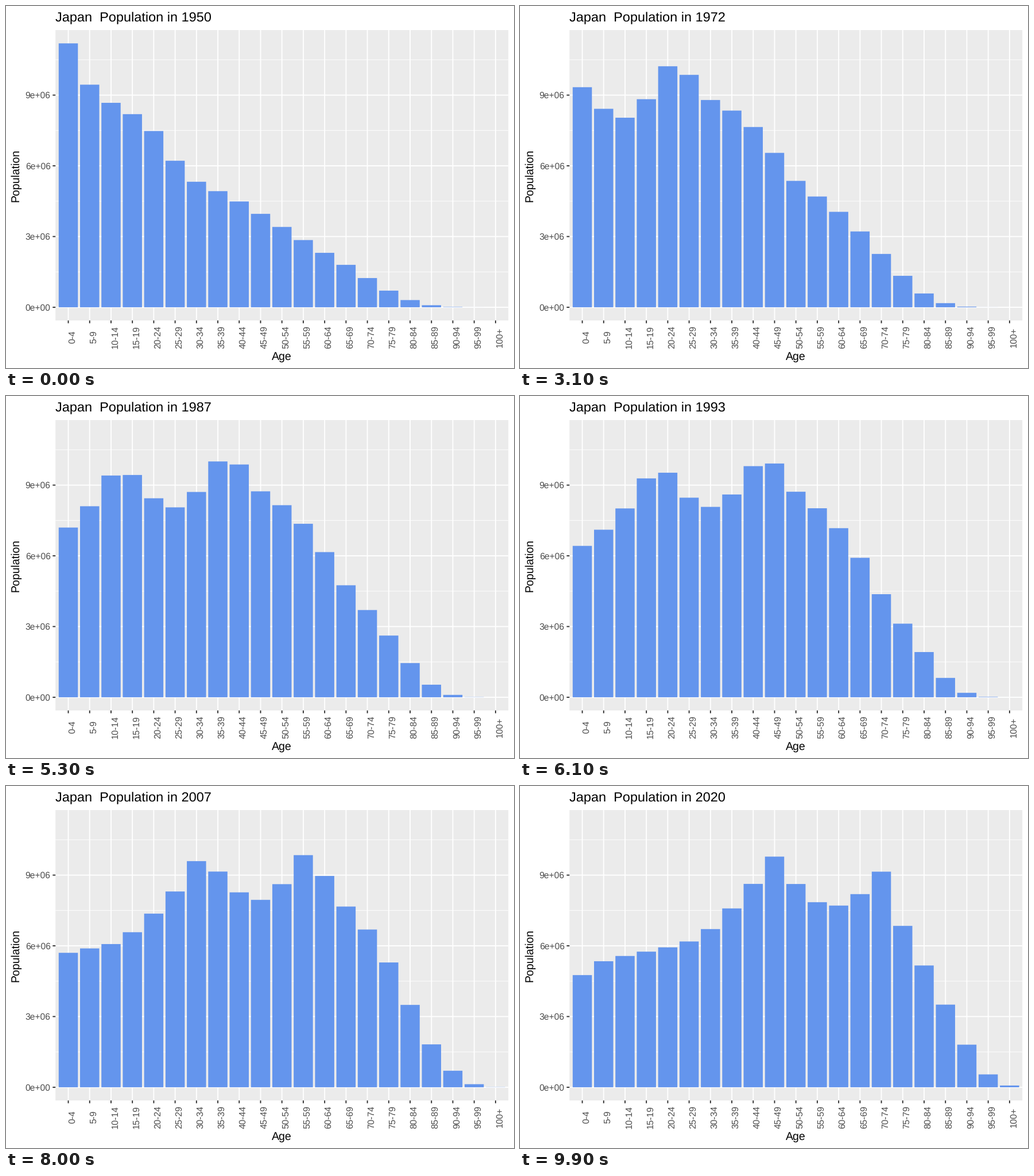
A matplotlib script that plays this animation: 885 by 632 pixels, repeating every 10 s.

```python
import numpy as np
import matplotlib
import matplotlib.pyplot as plt
from matplotlib.animation import FuncAnimation
from matplotlib.patches import Rectangle

matplotlib.rcParams["font.family"] = "Liberation Sans"
matplotlib.rcParams["text.hinting"] = "none"

W, H, DPI = 885, 632, 128
FRAMES, INTERVAL = 100, 100
FIRST, LAST = 1950, 2020

# Panel geometry in pixels, y pointing down
LEFT, RIGHT, TOP, BOTTOM = 86.2, 875.2, 42.0, 549.0
ZERO = BOTTOM - (BOTTOM - TOP) / 22
PER_MILLION = (ZERO - TOP) * 20 / 21 / 11.2
STEP = (RIGHT - LEFT) / 21.2
TICK = 4.9

STARTS = np.arange(0, 101, 5)
AGES = [f"{a}-{a + 4}" if a < 100 else "100+" for a in STARTS]
CENTERS = LEFT + STEP * (0.6 + np.arange(len(AGES)))

# Turning points of the five-year birth cohorts: mid birth year -> millions
COHORTS = {
    1870: 2.7, 1890: 3.2, 1899: 3.85, 1909: 4.72, 1919: 5.45, 1923: 6.25,
    1928: 7.5, 1934: 8.35, 1940: 8.85, 1944: 9.65, 1946: 10.15, 1948: 11.2,
    1949: 10.55, 1951: 9.95, 1954: 9.0, 1960: 8.05, 1966: 8.5, 1971: 9.55,
    1973: 10.0, 1976: 9.3, 1980: 8.2, 1988: 6.75, 1994: 6.1, 2010: 5.5,
    2014: 5.3, 2018: 4.76,
}


def population(year):
    """Millions per age group: cohort size times Gompertz survival."""
    age = STARTS + 2
    born = year - age
    lifespan = 81.7 + 9.4 * np.tanh((born - 1908) / 25)
    survival = np.exp(-np.exp((age - lifespan) / 11.5))
    return np.interp(born, list(COHORTS), list(COHORTS.values())) * survival


def tween():
    """Spread the yearly values over all frames, linear in between."""
    years = np.arange(FIRST, LAST + 1)
    rows = np.array([population(y) for y in years])
    keys = np.round((years - FIRST) * (FRAMES - 1) / (LAST - FIRST))
    return np.array([np.interp(np.arange(FRAMES), keys, v) for v in rows.T]).T


HEIGHTS = tween() * PER_MILLION

fig = plt.figure(figsize=(W / DPI, H / DPI), dpi=DPI, facecolor="white")
ax = fig.add_axes([0, 0, 1, 1])
ax.set_xlim(0, W)
ax.set_ylim(H, 0)
ax.axis("off")


def line(x0, y0, x1, y1, color="white", width=1.067, z=2):
    ax.plot([x0, x1], [y0, y1], color=color, lw=width, zorder=z,
            solid_capstyle="butt", snap=False)


def rect(x, y, w, h, color, z):
    return ax.add_patch(Rectangle((x, y), w, h, fc=color, lw=0, zorder=z,
                                  snap=False))


def label(x, y, text, size, color="black", ha="center", angle=0):
    return ax.text(x, y, text, size=size, color=color, ha=ha, va="baseline",
                   rotation=angle, rotation_mode="anchor")


rect(LEFT, TOP, RIGHT - LEFT, BOTTOM - TOP, "#EBEBEB", 0)

for m in np.arange(1.5, 11, 3):
    y = ZERO - m * PER_MILLION
    line(LEFT, y, RIGHT, y, width=0.533, z=1)

for m in range(0, 10, 3):
    y = ZERO - m * PER_MILLION
    line(LEFT, y, RIGHT, y)
    line(LEFT - TICK, y, LEFT, y, "#333333")
    label(77.6, y + 5.6, f"{m}e+{'06' if m else '00'}", 8.8, "#4D4D4D", "right")

for x, age in zip(CENTERS, AGES):
    line(x, TOP, x, BOTTOM)
    line(x, BOTTOM, x, BOTTOM + TICK, "#333333")
    label(x + 11.4, 578, age, 8.8, "#4D4D4D", angle=90)

label((LEFT + RIGHT) / 2, 617.8, "Age", 11)
label(22.2, (TOP + BOTTOM) / 2, "Population", 11, angle=90)
title = label(LEFT, 26.9, "", 13.2, ha="left")
bars = [rect(x - 0.45 * STEP, ZERO, 0.9 * STEP, 0, "#6495ED", 3)
        for x in CENTERS]


def draw(i):
    year = round(FIRST + i * (LAST - FIRST) / (FRAMES - 1))
    title.set_text(f"Japan  Population in {year}")
    for bar, h in zip(bars, HEIGHTS[i]):
        bar.set_height(-h)
    return [title, *bars]


anim = FuncAnimation(fig, draw, frames=FRAMES, interval=INTERVAL,
                     repeat=True, repeat_delay=0)
plt.show()
```
